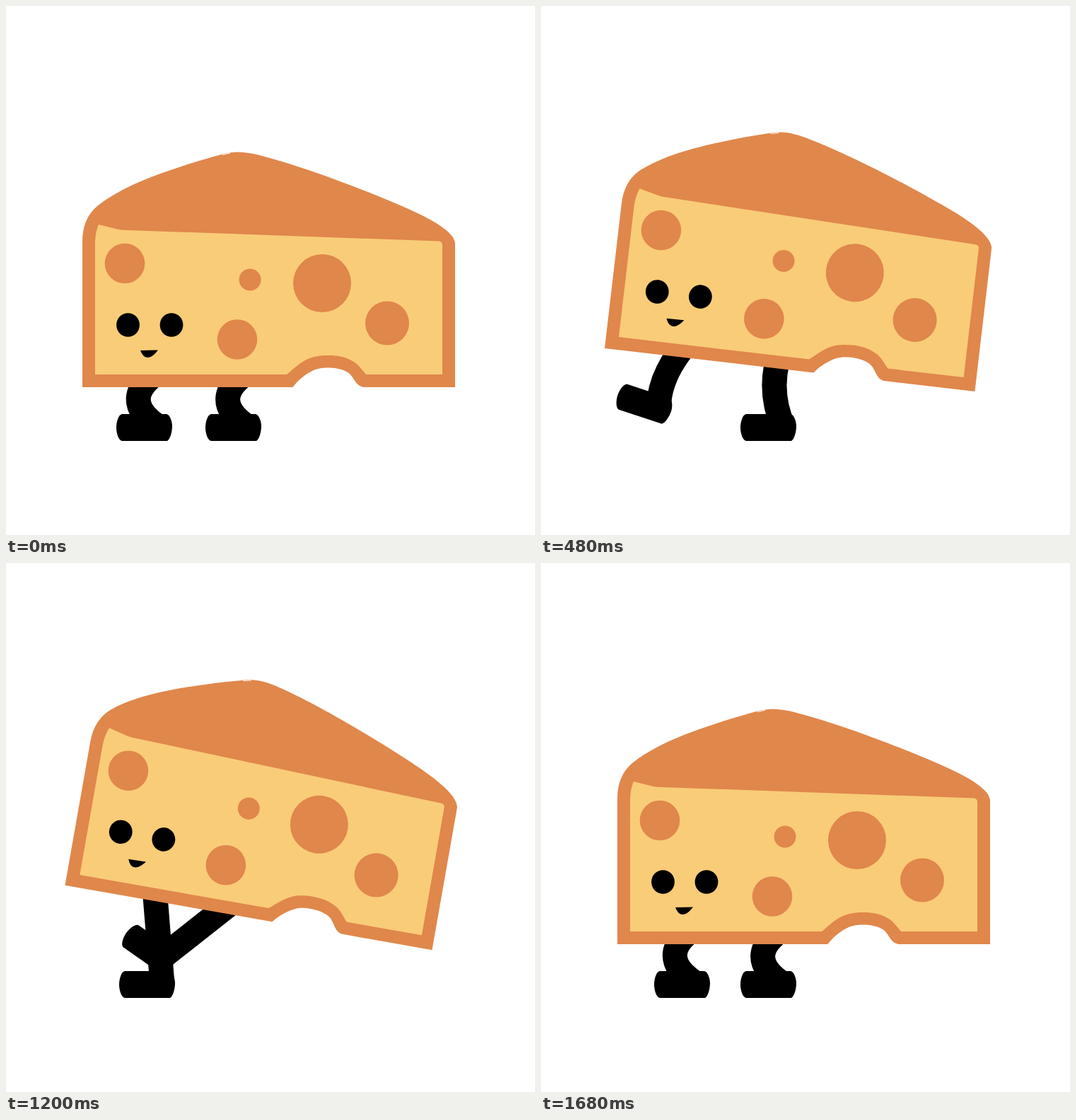
An HTML page that plays this animation: 748x748 px, repeating every 1920 ms.

```html
<!DOCTYPE html>
<html>
<head>
<meta charset="utf-8">
<style>
  html, body { margin: 0; width: 100%; height: 100%; overflow: hidden; background: #fff; }
  svg { display: block; width: 100%; height: 100%; }
</style>
</head>
<body>
<svg viewBox="0 0 748 748">
  <defs>
    <path id="foot" d="M-53-19H10C15-18 18-8 18-2C18 6 15 17 11 19H-53C-58 18-61 8-61 0C-61-8-58-18-53-19Z"/>
  </defs>
  <g class="leg"><path fill="none" stroke="#000" stroke-width="35"/><use href="#foot"/></g>
  <g class="leg"><path fill="none" stroke="#000" stroke-width="35"/><use href="#foot"/></g>
  <g id="body">
    <path fill="#e0874b" d="M108 539V333C108 310 116 294 129 283C140 274 152 267 164 260.500C200 241 260 222 308 209C322 205.500 332 205.500 350 209C410 223 500 257 560 283C590 296 633 316 635 335V539H508C496 539 494 529 486 520C478 513 464 511.500 455 511.500C446 511.500 440 513 436 514.500C424 520 414 528 405.500 539Z"/>
    <path fill="none" stroke="#fff" d="M306 210.500L317 208"/>
    <path fill="#f9cc78" d="M131 309L155 315Q160 316.500 165 316.700L612 332.500Q617 333 617 338V521H509C500 510 496 505 490 502C480 496 468 494 456 494C444 494 434 496 427 499C414 505 407 513 397 521H126V336C126 325 128 316 131 309Z"/>
    <g fill="#e0874b">
      <circle cx="168" cy="364" r="28.300"/>
      <circle cx="345" cy="387" r="15.500"/>
      <circle cx="447" cy="392" r="41"/>
      <circle cx="539" cy="448.500" r="31"/>
      <circle cx="327" cy="471.500" r="28.300"/>
    </g>
    <ellipse cx="172.500" cy="451" rx="16.400" ry="16.800"/>
    <ellipse cx="234" cy="451" rx="16.400" ry="16.800"/>
    <path d="M190 487L215 486.500C210 493 205 497 200.500 497C195 497 192 492 190 487Z"/>
  </g>
</svg>
<script>
const LOOP = 1920, STEP = 80;
const PIVOT = [572, 357];
const MAX_TILT = 10, KNEE_BEND = 36;
const body = document.getElementById('body');
const legs = [...document.querySelectorAll('.leg')];
const hips = [[230, 508], [357, 508]];

// Keys: [step, ...values], linear in between
const tiltKeys = [[0, 0], [3, 10], [5, 10], [8, 0], [12, 0], [15, 10], [17, 10], [20, 0]];
// Ankle x, ankle y, foot angle
const ankleKeys = [
  [[0, 217, 596, 0], [4, 57, 516, 54.7], [7, 221, 596, 0]],
  [[12, 343, 596, 0], [16, 179, 545.5, 46.7], [21, 343, 596, 0]]
];

function sample(keys, t) {
  if (t <= keys[0][0]) return keys[0].slice(1);
  const i = keys.findIndex(key => key[0] >= t);
  if (i < 0) return keys[keys.length - 1].slice(1);
  const a = keys[i - 1], b = keys[i];
  const k = (t - a[0]) / (b[0] - a[0]);
  return a.slice(1).map((v, j) => v + (b[j + 1] - v) * k);
}

function rotate([x, y], degrees) {
  const a = degrees * Math.PI / 180, c = Math.cos(a), s = Math.sin(a);
  const dx = x - PIVOT[0], dy = y - PIVOT[1];
  return [PIVOT[0] + dx * c - dy * s, PIVOT[1] + dx * s + dy * c];
}

function draw(now) {
  const t = Math.floor(now % LOOP / STEP);
  const [tilt] = sample(tiltKeys, t);
  body.setAttribute('transform', `rotate(${tilt} ${PIVOT})`);
  const bend = KNEE_BEND * (1 - tilt / MAX_TILT);
  legs.forEach((leg, i) => {
    const [hx, hy] = rotate(hips[i], tilt);
    const [ax, ay, angle] = sample(ankleKeys[i], t);
    const [limb, foot] = leg.children;
    limb.setAttribute('d',
      `M${hx} ${hy}Q${(hx + ax) / 2 - 2 * bend} ${(hy + ay) / 2} ${ax} ${ay}`);
    foot.setAttribute('transform', `translate(${ax} ${ay}) rotate(${angle})`);
  });
}

const start = performance.now();
function tick() {
  draw(performance.now() - start);
  requestAnimationFrame(tick);
}
tick();
</script>
</body>
</html>
```
